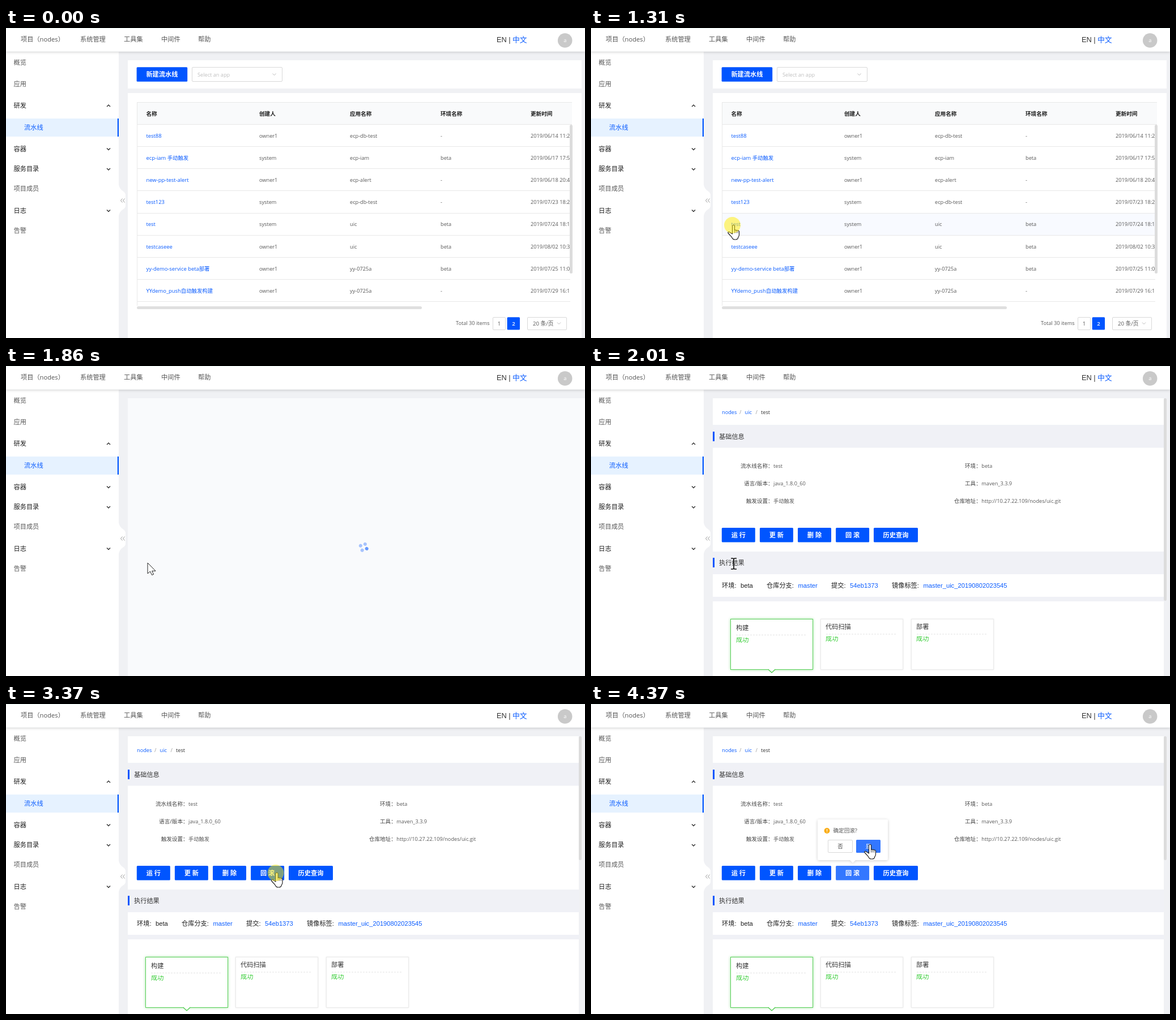
An HTML page that plays this animation: 1022x548 px, repeating every 5.91 s.

```html
<!DOCTYPE html>
<html lang="zh-CN">
<head>
<meta charset="utf-8">
<style>
  html, body { margin: 0; width: 100%; height: 100%; overflow: hidden; background: #fff; }
  svg { display: block; font-family: "Open Sans", "Noto Sans CJK SC", "Noto Sans CJK", sans-serif; white-space: pre; }
  .arial { font-family: "Liberation Sans", "Noto Sans CJK SC", "Noto Sans CJK", sans-serif; }
</style>
</head>
<body>
<svg id="stage" width="1022" height="548" viewBox="0 0 1022 548"></svg>
<script>
const LOOP = 5910;
const BLUE = '#0055ff', HOVER = '#3377ff', LINK = '#0a5cff', GREY = '#595959', DARK = '#1c1c1c', LINE = '#e8e8e8', BACK = '#f0f1f4';

const rect = (x, y, w, h, fill, more = '') =>
  `<rect x="${x}" y="${y}" width="${w}" height="${h}" fill="${fill}" ${more}/>`;
const path = (d, stroke, width = 1, more = 'fill="none"') =>
  `<path d="${d}" stroke="${stroke}" stroke-width="${width}" ${more}/>`;
// y is the middle of the line of text; baselines sit on whole pixels
const text = (s, x, y, size = 9.2, fill = GREY, more = '') =>
  `<text x="${x}" y="${Math.round(y + size * .36)}" font-size="${size}" fill="${fill}" ${more}>${s}</text>`;
const group = (id, body, more = '') => `<g id="${id}" ${more}>${body}</g>`;
const box = (x, y, w, h, stroke = '#d9d9d9') =>
  rect(x + .5, y + .5, w - 1, h - 1, '#fff', `stroke="${stroke}" rx="1.5"`);
const chevron = (x, y, dir, color, width = 1.4) =>
  path(`M${x - 3} ${y - 1.5 * dir}l3 ${3 * dir}l3 ${-3 * dir}`, color, width);
const button = (label, x, y, w, h, id = '') =>
  rect(x, y, w, h, BLUE, `rx="1.5" id="${id}"`) +
  text(label, x + w / 2, y + h / 2, 11.2, '#fff', 'text-anchor="middle" font-weight="600"');

function frame() {
  const nav = [['项目（nodes）', 26], ['系统管理', 131], ['工具集', 208], ['中间件', 274], ['帮助', 339]];
  const menu = [['概览', 60.5], ['应用', 98.5], ['研发', 137, -1], ['容器', 213.5, 1], ['服务目录', 249, 1],
    ['项目成员', 284], ['日志', 322.5, 1], ['告警', 357.5]];
  return rect(0, 42, 199, 506, '#fff') +
    path('M199 277Q200 284 206 288Q211 291 211 296V314Q211 318 206 321Q200 325 199 332Z', 'none', 0, 'fill="#fff"') +
    path('M205.5 301.5l-3 3.5l3 3.5M209.5 301.5l-3 3.5l3 3.5', '#999') +
    rect(0, 160, 199, 32, '#e6f2ff') + rect(196.8, 160, 2.2, 32, BLUE) +
    text('流水线', 32, 175.5, 11.2, LINK) +
    menu.map(([s, y, dir]) => text(s, 13.5, y, 11.2, dir ? DARK : GREY, dir ? 'font-weight="500"' : '') +
      (dir ? chevron(181, y + .5, dir, '#333') : '')).join('') +
    rect(0, 0, 1022, 41.5, '#fff', 'filter="url(#soft)"') + rect(0, 0, 1022, 1, '#effbf8') +
    nav.map(([s, x]) => text(s, x, 20, 11.2, '#555')).join('') +
    text('EN | ', 866, 20.5, 12.8, '#333', 'class="arial"') + text('中文', 894, 20.5, 12.8, LINK) +
    '<circle cx="986.7" cy="22" r="12.8" fill="#c9c9c9"/>' +
    text('a', 986.7, 22, 9.2, '#fff', 'text-anchor="middle"');
}

const rowY = i => 170.5 + 39.15 * i;

function listPage() {
  const columns = [247.5, 447, 607, 767, 926];
  const rows = [
    ['test88', 'owner1', 'ecp-db-test', '-', '2019/06/14 11:2'],
    ['ecp-iam 手动触发', 'system', 'ecp-iam', 'beta', '2019/06/17 17:5'],
    ['new-pp-test-alert', 'owner1', 'ecp-alert', '-', '2019/06/18 20:4'],
    ['test123', 'system', 'ecp-db-test', '-', '2019/07/23 18:2'],
    ['test', 'system', 'uic', 'beta', '2019/07/24 18:1'],
    ['testcaseee', 'owner1', 'uic', 'beta', '2019/08/02 10:3'],
    ['yy-demo-service beta部署', 'owner1', 'yy-0725a', 'beta', '2019/07/25 11:0'],
    ['YYdemo_push自动触发构建', 'owner1', 'yy-0725a', '-', '2019/07/29 16:1']];
  const cells = rows.map((row, i) =>
    row.map((s, c) => text(s, columns[c], rowY(i) + 20, c ? 9.2 : 9.4, c ? GREY : LINK, c ? '' : `id="link${i}"`)).join('') +
    rect(231, Math.floor(rowY(i + 1)), 765, 1, LINE)).join('');
  return rect(215, 57, 801, 50, '#fff') + rect(215, 115, 801, 433, '#fff') +
    button('新建流水线', 230.6, 69.2, 89.6, 25.6) +
    box(328, 69, 160, 26) + text('Select an app', 338, 83, 9.2, '#bfbfbf') + chevron(473.5, 82, 1, '#bbb', 1) +
    rect(231, 131, 768, 39, '#f9fafb') + rect(231, 131, 768, 1, LINE) + rect(231, 170, 768, 1, LINE) +
    ['名称', '创建人', '应用名称', '环境名称', '更新时间'].map((s, c) =>
      text(s, columns[c], 151.5, 9.6, DARK, 'font-weight="600"')).join('') +
    rect(231, 0, 765, 38, '#f8faff', 'id="hover"') +
    group('cells', cells, 'clip-path="url(#table)"') +
    rect(231, 131, 1, 360, LINE) +
    rect(995, 171, 5, 263, '#dcdcdc', 'rx="2.5"') + rect(231, 492, 503, 5, '#dfdfdf', 'rx="2.5"') +
    text('Total 30 items', 794, 522, 9.2) +
    box(859, 511, 23, 23) + text('1', 870.5, 522.5, 9.6, GREY, 'text-anchor="middle"') +
    rect(884.6, 511.2, 22.4, 22.4, BLUE, 'rx="1.5"') +
    text('2', 896, 522.5, 9.6, '#fff', 'text-anchor="middle" font-weight="600"') +
    box(920, 511, 70, 23) + text('20 条/页', 930, 523, 9.7) + chevron(976, 522, 1, '#bbb', 1);
}

function loadingPage() {
  const dots = [[0, -6], [6, 0], [0, 6], [-6, 0]].map(([x, y]) => `<circle cx="${x}" cy="${y}" r="3" fill="${BLUE}"/>`);
  return rect(215, 57, 807, 491, '#f9fafc') + group('spinner', dots.join(''));
}

function detailPage() {
  const heading = (s, y) => rect(215, y - 8.5, 3, 17, BLUE) + text(s, 226, y, 11.2, '#333');
  const info = (label, value, x, y) =>
    text(label + '：', x, y, 9.6, '#444', 'text-anchor="end"') + text(value, x + .5, y, 9.2);
  const build = [['环境:', 231], ['beta', 264], ['仓库分支:', 310], ['master', 365.5, 1], ['提交:', 424],
    ['54eb1373', 457, 1], ['镜像标签:', 531], ['master_uic_20190802023545', 586.5, 1]];
  const card = (title, x, y, active) =>
    rect(x + .5, 447.5, 145, 89, '#fff', active
      ? 'stroke="#5ccf5c" filter="url(#glow)"' : 'stroke="#ebebeb" filter="url(#faint)"') +
    text(title, x + 10 - !active, y, 11.2, '#333') +
    path(`M${x + 10} ${y + 13}H${x + 135}`, '#e3e3e3', 1, 'stroke-dasharray="3 2"') +
    `<svg x="${x}" y="${Math.round(y + 17)}" width="60" height="13">${text('成功', 10 - !active, 4, 11.2, '#3c3')}</svg>`;
  return rect(215, 57, 796, 491, '#f0f1f6') +
    [[57, 47], [144.5, 183.5], [368, 40], [416, 132]].map(([y, h]) => rect(215, y, 796, h, '#fff')).join('') +
    text('nodes', 231, 81.5, 9.2, LINK) + text('/', 262, 81.5, 9.2, '#999') + text('uic', 271.5, 81.5, 9.2, LINK) +
    text('/', 290.5, 81.5, 9.2, '#999') + text('test', 300, 81.5, 9.2, '#333') +
    heading('基础信息', 124.5) + heading('执行结果', 347.5) +
    info('流水线名称', 'test', 321.6, 176.5) + info('环境', 'beta', 688.8, 176.5) +
    info('语言/版本', 'java_1.8.0_60', 321.6, 207.5) + info('工具', 'maven_3.3.9', 688.8, 207.5) +
    info('触发设置', '手动触发', 321.6, 238.5) + info('仓库地址', 'http://10.27.22.109/nodes/uic.git', 688.8, 238.5) +
    ['运 行', '更 新', '删 除', '回 滚'].map((s, i) => button(s, 230.8 + 67.1 * i, 286, 59, 25.6, 'act' + i)).join('') +
    button('历史查询', 499, 286, 78, 25.6) +
    build.map(([s, x, link]) => text(s, x, 388, 11.2, link ? LINK : DARK, 'class="arial"')).join('') +
    card('构建', 246, 462.5, true) + card('代码扫描', 405, 461, false) + card('部署', 565, 461, false) +
    path('M312.5 536L319 542L325.5 536', '#5ccf5c', 1.5, 'fill="#fff"') +
    rect(1011, 57, 5, 219, '#dcdcdc', 'id="scroll" rx="2.5"');
}

function popConfirm() {
  return `<g filter="url(#soft)">${rect(400, 204, 124, 72, '#fff', 'rx="3"')}
    ${path('M457 275.5L462 280.5L467 275.5Z', 'none', 0, 'fill="#fff"')}</g>` +
    '<circle cx="416.5" cy="224" r="5" fill="#faad14"/>' + rect(416, 221, 1.1, 4, '#fff') + rect(416, 226, 1.1, 1.1, '#fff') +
    text('确定回滚?', 427.5, 224, 9.6, '#555') +
    box(418, 240, 44, 23) + text('否', 440, 252, 9.6, '#444', 'text-anchor="middle"') +
    rect(468, 240, 43, 23, BLUE, 'id="yes" rx="1.5"') + text('是', 489.5, 252, 9.6, '#fff', 'text-anchor="middle"');
}

const pointers = {
  arrow: path('M0 0V19L4.5 15L7.5 21.5L10.5 20.3L7.7 14.3H14Z', '#222', 1, 'fill="#fff"'),
  hand: path('M0 1Q2-1.5 4 1V9Q5.3 7.7 6.7 9.5Q8 8.2 9.4 10Q10.7 9 12 11V17Q12 20 10 22V23Q9 25.5 5 25.5Q1 25.5 0 23' +
    'Q-1.5 20-4 18L-7.5 14Q-8 11.5-5.5 12L0 15.5Z', '#222', 1.2, 'fill="#fff" stroke-linejoin="round"') +
    path('M4 9V14M6.7 10V14M9.4 11V14', '#222', .8),
  beam: path('M-5-9H-1.5L0-8L1.5-9H5M0-8V9M-5 10H-1.5L0 9L1.5 10H5', '#111', 1.7)
};

const stage = document.getElementById('stage');
const shadow = (id, dy, blur, color, opacity) => `<filter id="${id}" x="-20%" y="-50%" width="140%" height="200%">
  <feDropShadow dx="0" dy="${dy}" stdDeviation="${blur}" flood-color="${color}" flood-opacity="${opacity}"/></filter>`;
stage.innerHTML = `<defs>${shadow('soft', 1, 2.4, '#000', .2)}${shadow('glow', 0, 2, '#4c4', .55)}
  ${shadow('faint', 0, 1.2, '#000', .1)}<clipPath id="table">${rect(231, 170, 765, 320, '#000')}</clipPath></defs>` +
  rect(0, 0, 1022, 548, BACK) +
  group('list', listPage()) + group('loading', loadingPage()) + group('detail', detailPage()) +
  frame() + group('pop', popConfirm()) +
  group('pointer', Object.entries(pointers).map(([id, body]) => group(id, body)).join('')) +
  '<circle id="click" r="14.5" fill="#ffeb00" fill-opacity=".5"/>';

const el = id => document.getElementById(id);
const show = (id, on) => el(id).setAttribute('display', on ? 'inline' : 'none');
const set = (id, name, value) => el(id).setAttribute(name, value);
const last = (list, t) => list.filter(item => item[0] <= t).pop();

// start, end, steps, from x y, to x y
const moves = [
  [360, 850, 7, 221, 448, 245.5, 350.5],
  [920, 1140, 4, 248, 349.5, 249.5, 348.5],
  [1470, 1470, 1, 250, 348],
  [2010, 2010, 1, 252, 349],
  [2480, 2630, 3, 310, 389, 444, 366],
  [2790, 2950, 4, 465, 340, 484, 297],
  [3100, 3370, 4, 482, 298, 476, 298.5],
  [3900, 4160, 4, 480, 287, 490.5, 252],
  [4300, 4370, 2, 490.5, 250.5, 490.5, 248.5]];
const shapes = [[360, 'arrow'], [920, 'hand'], [1470, 'arrow'], [2010, 'beam'], [2480, 'arrow'],
  [2940, 'hand'], [3980, 'arrow'], [4150, 'hand']];

function pointerAt(t) {
  const [start, end, steps, x0, y0, x1, y1] = last(moves, t);
  if (steps === 1) return [x0, y0];
  const n = steps - 1;
  const k = Math.min(n, Math.floor((t - start) / (end - start) * n + 1e-6)) / n;
  return [x0 + (x1 - x0) * k, y0 + (y1 - y0) * k];
}

function draw(t) {
  show('list', t < 1470);
  show('loading', t >= 1470 && t < 2010);
  show('detail', t >= 2010);

  const visible = t >= 360;
  const [x, y] = visible ? pointerAt(t) : [0, 0];
  const shape = visible && last(shapes, t)[1];
  show('pointer', visible);
  set('pointer', 'transform', `translate(${x} ${y})`);
  for (const id in pointers) show(id, id === shape);
  show('click', (t >= 1310 && t < 1470) || (t >= 3370 && t < 3520));
  set('click', 'cx', x);
  set('click', 'cy', y);

  const row = Math.floor((y - 170.5) / 39.15);
  show('hover', visible && x >= 231 && t < 1470);
  set('hover', 'y', Math.floor(rowY(row)) + 1);
  set('link4', 'fill', t >= 920 ? HOVER : LINK);

  const spin = Math.max(0, Math.floor((t - 1470) / 77)) * 77;
  set('spinner', 'transform', `translate(631.3 320.3) rotate(${spin * .3})`);
  [...el('spinner').children].forEach((dot, i) =>
    dot.setAttribute('opacity', .33 + .67 * Math.max(0, spin - 400 * i) / 1000));

  set('scroll', 'height', t < 2170 ? 358 : t < 2480 ? 340 : 219);
  set('act3', 'fill', t >= 3100 && !(t >= 3370 && t < 3520) ? HOVER : BLUE);

  const open = Math.min(1, (Math.floor((t - 3520) / 76.6) + 1) / 4);
  const scale = .8 + .2 * open;
  show('pop', t >= 3520);
  set('pop', 'opacity', Math.max(0, open));
  set('pop', 'transform', `translate(462 280) scale(${scale}) translate(-462 -280)`);
  set('yes', 'fill', t < 4300 ? BLUE : t < 4370 ? '#1a66ff' : HOVER);
}

const begin = performance.now();
(function tick() {
  draw((performance.now() - begin) % LOOP);
  requestAnimationFrame(tick);
})();
</script>
</body>
</html>
```
